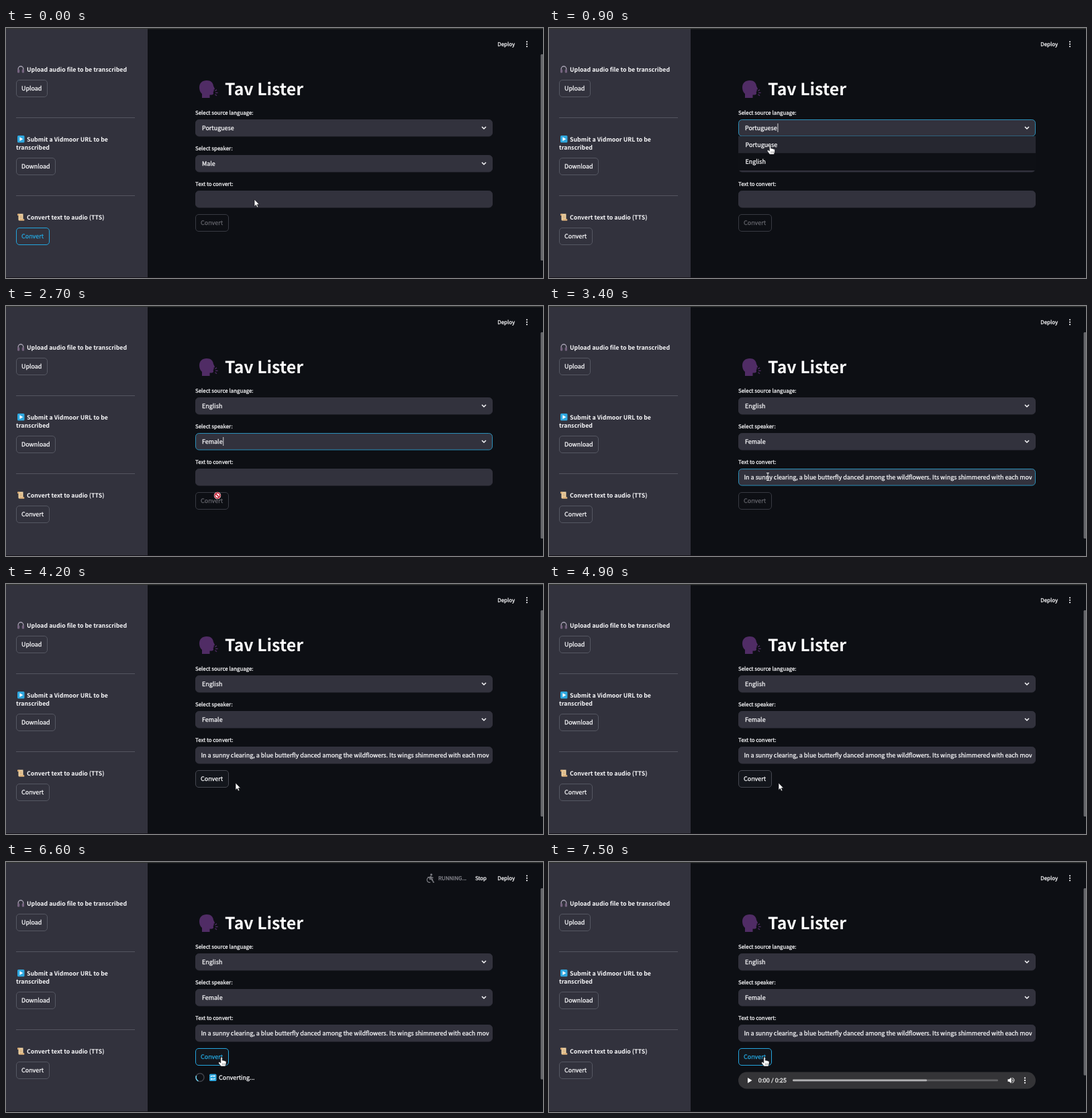
An HTML page with a canvas that plays this animation: 800 by 372 pixels, repeating every 8000 ms.

```html
<!DOCTYPE html>
<html lang="en">
<head>
<meta charset="utf-8">
<title>Speech tool demo</title>
<style>
html, body { margin: 0; width: 100%; height: 100%; overflow: hidden; background: #0d0f14; }
canvas { display: block; width: 800px; height: 372px; }
</style>
</head>
<body>
<canvas id="stage"></canvas>
<script>
const W = 800, H = 372, LOOP = 8000, TICK = 100;
const SANS = '"Noto Sans CJK JP", "Noto Sans CJK SC", "Noto Sans CJK", "Noto Sans", sans-serif';
const BASE = 8.96, SMALL = 7.88, STRONG = 8.77;
const BG = '#0d0f14', PANEL = '#32323d', INK = '#f8f8fa', BLUE = '#24a5dd', RING = '#2b8fb8';
const STORY = 'In a sunny clearing, a blue butterfly danced among the wildflowers. ' +
  'Its wings shimmered with each movement of the breeze.';

const canvas = document.getElementById('stage');
const ctx = canvas.getContext('2d');
const dpr = window.devicePixelRatio || 1;
canvas.width = W * dpr;
canvas.height = H * dpr;

// time, x, y of the hot spot, cursor shape
const MOVES = [
  [0, 370, 255, 'arrow'], [400, 370, 255, 'arrow'], [500, 362, 232, 'arrow'],
  [700, 338, 152, 'hand'], [800, 333, 163, 'hand'], [900, 329.5, 174, 'hand'],
  [1100, 324, 197, 'hand'], [1300, 322, 199, 'hand'], [1400, 322, 199, 'hand'],
  [1700, 322, 203, 'hand'], [1900, 324, 215, 'hand'], [2200, 322, 249, 'hand'],
  [2400, 321, 251, 'hand'], [2500, 321, 251, 'beam'], [2700, 315, 282, 'blocked'],
  [2900, 322, 255, 'beam'], [3100, 326, 254, 'beam'], [3700, 326, 254, 'beam'],
  [4000, 341, 293, 'arrow'], [4200, 342, 296, 'arrow'], [5000, 342, 296, 'arrow'],
  [5200, 328, 291, 'hand'], [5400, 321, 290, 'hand'], [8000, 321, 290, 'hand']
];

const during = (t, from, to) => t >= from && t < to;

function fillPath(d, color) {
  ctx.fillStyle = color;
  ctx.fill(new Path2D(d));
}

function strokePath(d, color, width = 1) {
  ctx.strokeStyle = color;
  ctx.lineWidth = width;
  ctx.stroke(new Path2D(d));
}

function rect(x, y, w, h, color) {
  ctx.fillStyle = color;
  ctx.fillRect(x, y, w, h);
}

function round(x, y, w, h, r, fill, stroke) {
  ctx.beginPath();
  ctx.roundRect(x, y, w, h, r);
  if (fill) { ctx.fillStyle = fill; ctx.fill(); }
  if (stroke) { ctx.strokeStyle = stroke; ctx.lineWidth = 1; ctx.stroke(); }
}

function dot(x, y, r, color) {
  ctx.fillStyle = color;
  ctx.beginPath();
  ctx.arc(x, y, r, 0, Math.PI * 2);
  ctx.fill();
}

function arc(x, y, r, from, to, color, width) {
  ctx.strokeStyle = color;
  ctx.lineWidth = width;
  ctx.beginPath();
  ctx.arc(x, y, r, from, to);
  ctx.stroke();
}

// A hairline outline gives the slightly heavy look of small light text.
function text(str, x, y, size = BASE, color = INK, weight = 400, family = SANS) {
  ctx.font = `${weight} ${size}px ${family}`;
  ctx.fillStyle = ctx.strokeStyle = color;
  ctx.fillText(str, x, y);
  if (weight < 700) {
    ctx.lineWidth = 0.28;
    ctx.strokeText(str, x, y);
  }
}

function at(x, y, draw) {
  ctx.save();
  ctx.translate(x, y);
  draw();
  ctx.restore();
}

function button(label, x, y, w, look) {
  const [fill, border, ink] = {
    side: [PANEL, '#555762', INK],
    sideFocus: [PANEL, BLUE, BLUE],
    main: ['#13161c', '#454750', INK],
    mainFocus: ['#13161c', BLUE, BLUE],
    off: [BG, '#383a42', '#62636a']
  }[look];
  round(x + 0.5, y + 0.5, w - 1, 25, 4.5, fill, border);
  text(label, x + 8, y + 16.4, BASE, ink);
}

function kebab(x, y, gap, r) {
  for (const i of [-1, 0, 1]) dot(x, y + i * gap, r, INK);
}

function headphones() {
  strokePath('M18.2 62.5V60.8a3.8 3.8 0 0 1 7.6 0V62.5', '#a9a4b4', 1.3);
  round(17, 61.5, 3.2, 5.2, 1.3, '#75637f');
  round(23.8, 61.5, 3.2, 5.2, 1.3, '#75637f');
}

function playBadge() {
  round(17, 160, 10.5, 10.5, 1.6, '#2fa8df');
  fillPath('M20.3 162.3L25.3 165.2L20.3 168.2Z', '#fff');
}

function scroll() {
  fillPath('M18.5 276.5H25.5V284.5H27V286.5H19.5Q18.5 286.5 18.5 285Z', '#f0d3a4');
  fillPath('M17 276.5H19.5V279H17ZM20.5 284.5H27.3V286.5H20Z', '#d9a970');
  strokePath('M20.3 279.3H24M20.3 281H24M20.3 282.7H24', '#b58a5c', 0.6);
}

function talkingHead() {
  fillPath('M292 104V98C289.2 95.5 288 92 288 88.5C288 82 292.5 78 299 78' +
    'C305 78 308.6 81.4 309 86.3L311 90.4Q311.2 91.4 309.5 91.7L309.7 94L308.7 95' +
    'L309 97.8Q308.8 99.6 306.5 99.6L303.5 99.4V104Z', '#502c65');
  strokePath('M311.5 93.6L314 91.8M312 96.3H315.6M311.5 98.7L314 100.7', '#502c65', 1.3);
}

function sidebar(t) {
  rect(0, 0, 211, H, PANEL);
  headphones();
  text('Upload audio file to be transcribed', 31, 65.3, STRONG, INK, 700);
  button('Upload', 15, 77, 47, 'side');
  rect(15, 133, 177, 1, '#545560');
  playBadge();
  text('Submit a Vidmoor URL to be', 31, 168.7, STRONG, INK, 700);
  text('transcribed', 15, 180.5, STRONG, INK, 700);
  button('Download', 15, 193, 59, 'side');
  rect(15, 249, 177, 1, '#545560');
  scroll();
  text('Convert text to audio (TTS)', 31, 284.7, STRONG, INK, 700);
  button('Convert', 15, 297, 50, t < 700 ? 'sideFocus' : 'side');
}

function caret(str, x, y) {
  ctx.font = `400 ${BASE}px ${SANS}`;
  rect(x + ctx.measureText(str).width + 0.8, y, 0.8, 13, INK);
}

function select(label, value, y, focused, blink) {
  text(label, 282, y - 6.7, SMALL);
  round(282.5, y + 0.5, 442, 24.5, 5, PANEL, focused ? RING : PANEL);
  text(value, 292, y + 16.4);
  if (focused && blink) caret(value, 292, y + 6);
  strokePath(`M709 ${y + 11}l3 3l3 -3`, INK, 1.5);
}

function menu(items, y, hovered) {
  rect(282, y, 443, 51, '#0e1015');
  items.forEach((item, i) => {
    if (i === hovered) rect(282, y + i * 25.2, 443, 25.2, '#262730');
    text(item, 292.5, y + i * 25.2 + 16.2);
  });
}

function storyInput(t) {
  const focused = during(t, 3100, 4000);
  text('Text to convert:', 282, 235.3, SMALL);
  round(282.5, 242.5, 442, 24.5, 5, PANEL, focused ? RING : PANEL);
  if (t >= 3300) {
    ctx.save();
    ctx.beginPath();
    ctx.rect(290, 242, 429.5, 25);
    ctx.clip();
    text(STORY, 290.5, 258.2);
    ctx.restore();
  } else if (focused) {
    caret('', 290, 248);
  }
}

function runner(t) {
  const color = '#7b7c82';
  dot(633.6, 18.8, 1.6, color);
  arc(631, 26.6, 3.8, t / 250, t / 250 + 5.4, color, 1.2);
  strokePath('M632.8 21L631.2 25.5H635L636.5 30H638M632.2 22.2L628 23.2M632.5 22L636.5 23.6', color, 1.4);
}

function toolbar(t) {
  if (during(t, 1500, 1700) || during(t, 4600, 4800) || during(t, 5400, 7000)) {
    runner(t);
    text('RUNNING...', 644, 27.3, SMALL, '#888990');
    text('Stop', 699, 27.3, SMALL);
  }
  text('Deploy', 732.3, 27.3, SMALL);
  kebab(776, 24, 3.5, 1.1);
}

function progress(t) {
  const start = 0.75 + (t - 5700) / 750 * Math.PI * 2;
  arc(289, 320.5, 6, 0, Math.PI * 2, '#40424a', 1.5);
  arc(289, 320.5, 6, start, start + Math.PI / 2, '#6ccbea', 1.6);
  round(303, 315.5, 10.5, 10.5, 1.6, '#2fa8df');
  strokePath('M305.5 320V318.5H310.5M311 321.5V323H306', '#fff', 1);
  fillPath('M309.8 316.9L312 318.5L309.8 320.1ZM306.7 321.4L304.5 323L306.7 324.6Z', '#fff');
  text('Converting...', 317, 324.2);
}

function player() {
  round(282, 312.5, 443, 25, 12.5, '#343437');
  fillPath('M296 321L302.5 325L296 329Z', '#fff');
  text('0:00 / 0:25', 311.8, 328.2, 8.8, '#f4f4f4', 400, 'Roboto, sans-serif');
  round(363, 323.6, 306, 2.6, 1.3, '#626265');
  round(363, 323.6, 200, 2.6, 1.3, '#b0b0b2');
  fillPath('M683.5 323.2H685.7L688.6 320.6V329.4L685.7 326.8H683.5Z', '#fff');
  arc(688.8, 325, 2, -1.2, 1.2, '#fff', 1);
  arc(688.8, 325, 4, -1.2, 1.2, '#fff', 1);
  kebab(709, 325, 3.6, 1.15);
}

function scrollbar(t) {
  if (during(t, 800, 1500) || during(t, 2000, 2700)) return;
  const end = t < 5500 ? 346 : t < 7000 ? 323.5 : 317.5;
  round(796.5, 39, 4, end - 39, 1.5, '#66676b');
}

const cursors = {
  arrow() {
    const d = 'M0 0V10.5L2.4 8.3L4 12L5.8 11.2L4.2 7.7H7.4Z';
    fillPath(d, '#fff');
    strokePath(d, '#15161a', 0.7);
  },
  hand() {
    const d = 'M-1.2 1Q0 -.8 1.2 1V5.2Q2.3 4.5 3.2 5.6Q4.3 5 5.2 6.2Q6.8 5.8 7 7.4V10' +
      'L5.8 14H-.8L-4.3 9.2Q-4.8 7.2 -2.8 7.5L-1.2 9Z';
    fillPath(d, '#fff');
    strokePath(d, '#15161a', 0.7);
    strokePath('M1.4 9.5V12M3.3 9.5V12M5 9.5V12', '#333', 0.5);
  },
  beam() {
    strokePath('M-2 -5.5H2M0 -5.5V5.5M-2 5.5H2', '#e8e8ea', 1);
  },
  blocked() {
    dot(0, 0, 5.2, '#fff');
    arc(0, 0, 3.8, 0, Math.PI * 2, '#c32035', 1.7);
    strokePath('M-2.7 -2.7L2.7 2.7', '#c32035', 1.7);
  }
};

function cursor(t) {
  let i = MOVES.length - 2;
  while (MOVES[i][0] > t) i--;
  const [t0, x0, y0, shape] = MOVES[i], [t1, x1, y1] = MOVES[i + 1];
  const k = (t - t0) / (t1 - t0);
  at(x0 + (x1 - x0) * k, y0 + (y1 - y0) * k, cursors[shape]);
}

function mainArea(t) {
  talkingHead();
  text('Tav Lister', 326, 100.4, 24.8, '#fcfcfd', 700);
  const blink = t % 1000 < 500 || during(t, 600, 1000) || during(t, 1700, 2000) || during(t, 2500, 2900);
  select('Select source language:', t < 1300 ? 'Portuguese' : 'English', 136, during(t, 700, 1700), blink);
  select('Select speaker:', t < 2400 ? 'Male' : 'Female', 189, during(t, 1700, 3100), blink);
  storyInput(t);
  button('Convert', 282, 277, 50, t < 4000 ? 'off' : t < 5300 ? 'main' : 'mainFocus');
  if (during(t, 800, 1300)) menu(['Portuguese', 'English'], 161, t < 1100 ? 0 : 1);
  if (during(t, 1800, 2400)) menu(['Male', 'Female'], 214, t < 2100 ? 0 : 1);
  if (during(t, 5500, 7000)) progress(t);
  if (t >= 7000) player();
}

function draw(t) {
  ctx.setTransform(dpr, 0, 0, dpr, 0, 0);
  ctx.textRendering = 'geometricPrecision';
  ctx.lineJoin = 'round';
  rect(0, 0, W, H, BG);
  sidebar(t);
  mainArea(t);
  toolbar(t);
  scrollbar(t);
  rect(0, 0, W, 1.4, '#353735');
  rect(0, 371, W, 1, '#17141a');
  cursor(t);
}

const begin = performance.now();
function frame() {
  const t = (performance.now() - begin) % LOOP;
  draw(Math.floor(t / TICK) * TICK);
  requestAnimationFrame(frame);
}
frame();
</script>
</body>
</html>
```
